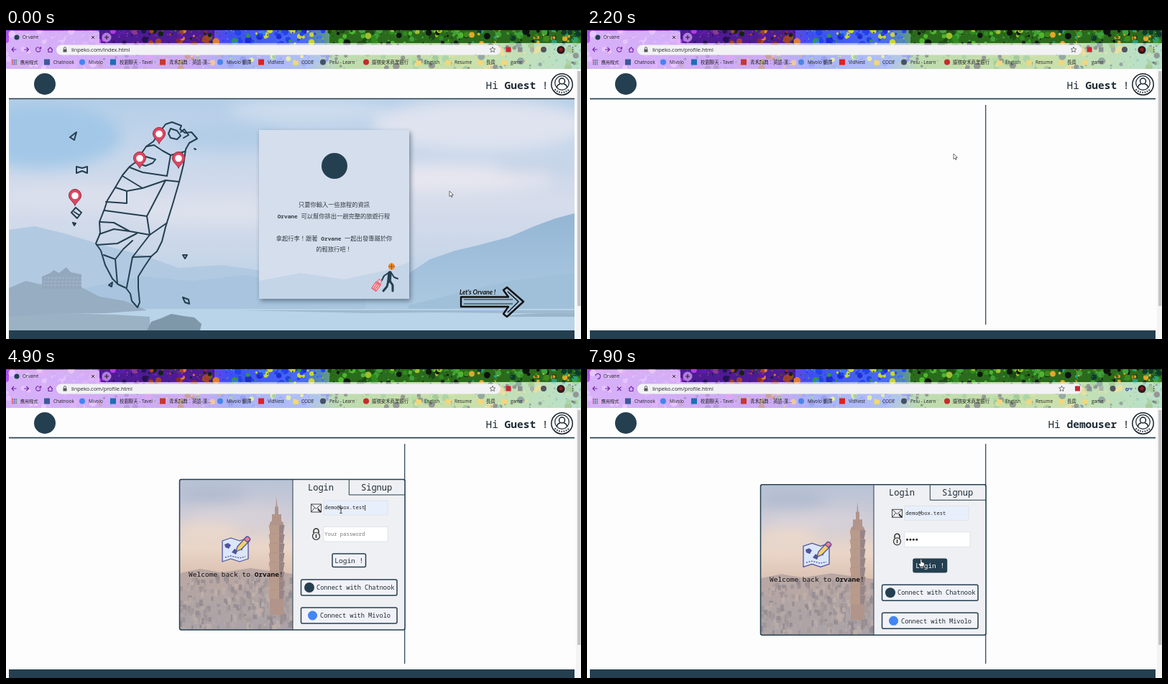
Write an HTML page that moves like this. It is 800x433 px and loops after 8 s.

```html
<!DOCTYPE html>
<html lang="zh-Hant">
<head>
<meta charset="utf-8">
<title>Orvane</title>
<style>
html, body { margin: 0; width: 100%; height: 100%; overflow: hidden; background: #fdfdfd; }
svg { display: block; width: 100vw; height: 100vh; }
text { font-family: "Open Sans", "Noto Sans CJK TC", "Noto Sans CJK JP", sans-serif; fill: #222; white-space: pre; }
.mono { font-family: "Noto Sans Mono", "DejaVu Sans Mono", monospace; fill: #1d2b35; }
.cjk { font-family: "Noto Sans CJK TC", "Noto Sans CJK JP", sans-serif; font-size: 8.27px; fill: #333c44; }
.cjk tspan { font: bold 7.8px "Noto Sans Mono", monospace; }
.bold { font-weight: bold; }
.ink { fill: none; stroke: #243f50; }
.map path { fill: none; stroke: #243f50; stroke-width: 2; stroke-linejoin: round; stroke-linecap: round; }
</style>
</head>
<body>
<svg id="stage" viewBox="0 0 800 433" preserveAspectRatio="none">
  <defs>
    <linearGradient id="paint">
      <stop offset="0" stop-color="#a44df0"/><stop offset=".33" stop-color="#8b3fe8"/>
      <stop offset=".39" stop-color="#3d50ee"/><stop offset=".52" stop-color="#4a6cf0"/>
      <stop offset=".58" stop-color="#6cb04a"/><stop offset=".8" stop-color="#86b83e"/>
      <stop offset="1" stop-color="#5cb888"/>
    </linearGradient>
    <linearGradient id="sky" x2="0" y2="1">
      <stop offset="0" stop-color="#b4cee8"/><stop offset=".25" stop-color="#c8d7eb"/>
      <stop offset=".45" stop-color="#d6dceb"/><stop offset=".65" stop-color="#cad7e9"/>
      <stop offset=".88" stop-color="#b6cfe6"/><stop offset="1" stop-color="#b8d2e8"/>
    </linearGradient>
    <linearGradient id="ridge" x2="0" y2="1">
      <stop offset="0" stop-color="#94b6d4"/><stop offset="1" stop-color="#aecae2"/>
    </linearGradient>
    <linearGradient id="dusk" x2="0" y2="1">
      <stop offset="0" stop-color="#b9c3d6"/><stop offset=".25" stop-color="#cfccd6"/>
      <stop offset=".45" stop-color="#ead6c8"/><stop offset=".62" stop-color="#dcc3b4"/>
      <stop offset=".7" stop-color="#b5a5a3"/><stop offset="1" stop-color="#a9a3a8"/>
    </linearGradient>
    <filter id="soft" x="-30%" y="-60%" width="160%" height="220%"><feGaussianBlur stdDeviation="10"/></filter>
    <filter id="shade" x="-10%" y="-10%" width="120%" height="120%"><feGaussianBlur stdDeviation="3"/></filter>
    <clipPath id="strip"><rect y="3" width="800" height="54"/></clipPath>
    <clipPath id="view"><rect x="4" y="100" width="787" height="321"/></clipPath>
    <clipPath id="pane"><rect x="242" y="157" width="157" height="209"/></clipPath>
  </defs>

  <rect width="800" height="433" fill="#fdfdfd"/>
  <g id="browser"></g>

  <g id="home">
    <g clip-path="url(#view)">
      <rect x="4" y="100" width="787" height="321" fill="url(#sky)"/>
      <g filter="url(#soft)">
        <ellipse cx="50" cy="150" rx="110" ry="45" fill="#a3c8e7"/>
        <ellipse cx="310" cy="150" rx="80" ry="20" fill="#b3cde7"/>
        <ellipse cx="420" cy="115" rx="110" ry="14" fill="#d0deee"/>
        <ellipse cx="660" cy="135" rx="150" ry="36" fill="#dfe3ef"/>
        <ellipse cx="610" cy="210" rx="150" ry="20" fill="#e6e6ef"/>
        <ellipse cx="100" cy="235" rx="110" ry="14" fill="#dbe0ec"/>
        <ellipse cx="300" cy="255" rx="130" ry="18" fill="#dde1ed"/>
        <ellipse cx="740" cy="195" rx="60" ry="7" fill="#c3d1e5"/>
      </g>
      <path d="M4 281L40 276 85 287 130 301 190 316 240 334 300 330 350 337 440 322 520 334 600 349V396H4Z" fill="#b1cae1"/>
      <path d="M110 362L190 346 260 352 330 344 420 356 520 366V396H110Z" fill="#a8c4de"/>
      <path d="M500 372L545 352 590 322 625 310 655 303 700 291 735 276 765 265 791 258V396H500Z" fill="url(#ridge)"/>
      <path d="M560 386L640 366 700 352 791 341V396H560Z" fill="#a0c0da"/>
      <rect x="4" y="391" width="787" height="30" fill="#b9d3e8"/>
      <path d="M330 393H791V398L600 396 500 397Z" fill="#9fbad0"/>
      <path d="M4 362L28 352 48 357 70 352 105 361 130 374 165 380 196 393 140 397 70 398 4 404Z" fill="#97adc2"/>
      <path d="M50 363V346L62 341 66 337 74 341 84 333 90 340 105 343V363Z" fill="#94a8bd"/>
      <path d="M53 348H104M52 353H105M52 358H105" stroke="#adbdcd" stroke-dasharray="3 2"/>
      <path d="M4 402L80 397 150 399 200 402V421H4Z" fill="#9bb2c5"/>
      <path d="M196 421L202 409 216 404 230 398 247 401 262 403 272 412 270 421Z" fill="#7f98a9"/>
      <path d="M700 400Q740 396 791 398V402H690Z" fill="#9ab5c9"/>
    </g>
    <g id="map" class="map"></g>
    <rect x="354" y="145" width="209" height="235" fill="#38495a" opacity=".6" filter="url(#shade)"/>
    <rect x="352" y="142" width="209" height="235" fill="#d5deec"/>
    <path d="M352 352L410 341 470 350 530 337 561 326V377H352Z" fill="#c4d5e8"/>
    <circle cx="457" cy="192" r="18" fill="#243f50"/>
    <g text-anchor="middle">
      <text class="cjk" x="456.500" y="249">只要你輸入一些旅程的資訊</text>
      <text class="cjk" x="456" y="265"><tspan>Orvane </tspan>可以幫你排出一趟完整的旅遊行程</text>
      <text class="cjk" x="456.500" y="295.500">拿起行李！跟著<tspan> Orvane </tspan>一起出發專屬於你</text>
      <text class="cjk" x="456" y="311">的輕旅行吧！</text>
    </g>
    <circle cx="536.500" cy="332" r="4.500" fill="#ee8a2c"/>
    <path d="M532 332h9M536.500 327.500v9" stroke="#7a4520" stroke-width=".7"/>
    <g fill="none" stroke="#243f50" stroke-linecap="round" stroke-linejoin="round">
      <path d="M534 341L533 352" stroke-width="5.500"/>
      <path d="M534 352L538 358 538 366M532 352L530 360 525 366" stroke-width="3"/>
      <path d="M536 341L540 347 545 349M532 341L526 345 523 351" stroke-width="2"/>
    </g>
    <g transform="rotate(35 515 359)">
      <rect x="511" y="353" width="9" height="13" rx="1.500" fill="#ee6a76"/>
      <path d="M513 356v8M515.500 356v8M518 356v8" stroke="#fff" stroke-width=".8"/>
      <path d="M513 353v-4h5v4" fill="none" stroke="#ee6a76"/>
    </g>
    <text x="631" y="371" font-size="8.800" style="font-family:Lato,sans-serif;font-style:italic;font-weight:bold;fill:#111">Let's Orvane !</text>
    <g fill="none" stroke="#111" stroke-width="2.400" stroke-linejoin="round">
      <path d="M633 374.500H699L692 365 697 361 720 381 697 402 692 398 699 388H633Z"/>
      <path d="M637 378H705M637 384H705" stroke-width=".9"/>
      <path d="M698 367L713 381 698 396" stroke-width="1.400"/>
    </g>
  </g>

  <path id="split" class="ink" d="M554.700 107V413" stroke-width="1.200"/>
  <g id="dialog"></g>

  <rect x="4" y="97.700" width="787" height="1.700" fill="#243f50"/>
  <rect x="4" y="421" width="787" height="12" fill="#243f50"/>
  <rect x="793" y="57" width="7" height="376" fill="#f4f4f4"/>
  <rect x="795" y="60" width="4.500" height="327" fill="#c5c5c7"/>
  <circle cx="54" cy="78" r="15" fill="#243f50"/>
  <text class="mono" x="754.500" y="85" font-size="14.500" text-anchor="end">Hi <tspan id="user" class="bold"></tspan> !</text>
  <g id="face" fill="none" stroke="#16222b" stroke-width="1.500">
    <circle cx="773.500" cy="78.500" r="14.700"/>
    <circle cx="773.500" cy="76.500" r="9.800" stroke-width="1.200"/>
    <circle cx="773.500" cy="74" r="4"/>
    <path d="M766.500 83Q767 78.500 771 78M780.500 83Q780 78.500 776 78"/>
    <path d="M763.500 85.500Q773.500 94 783.500 85.500" stroke-width="2" stroke-dasharray="1.500 1.800"/>
  </g>
  <g id="cursor">
    <path id="arrow" d="M0 0V7.500L1.800 6 2.900 8.500 4.100 8 3.100 5.500 5.300 5.300Z" fill="#fff" stroke="#333" stroke-width=".7"/>
    <path id="beam" d="M-1.700-3.500H-.3L0-3 .3-3.500H1.700M0-3V3M-1.700 3.500H-.3L0 3 .3 3.500H1.700" fill="none" stroke="#222" stroke-width=".9"/>
    <path id="hand" d="M-1.200-5Q0-6 .9-5V-1.500L4.300-.5V2.500L3.200 5H-1.500L-4 1Q-3.500-.5-1.200 1Z" fill="#fff" stroke="#222" stroke-width=".8"/>
  </g>
</svg>
<script>
const $ = id => document.getElementById(id);
const LOOP = 8000, INK = '#243f50';

const text = (x, y, size, str, attrs = '') =>
  `<text x="${x}" y="${y}" font-size="${size}" ${attrs}>${str}</text>`;
const mono = (x, y, size, str, attrs = '') => text(x, y, size, str, 'class="mono" ' + attrs);
const box = (x, y, w, h, attrs) => `<rect x="${x}" y="${y}" width="${w}" height="${h}" ${attrs}/>`;
const dot = (x, y, r, fill) => `<circle cx="${x}" cy="${y}" r="${r}" fill="${fill}"/>`;
const line = (d, color, width = 1.1, attrs = '') =>
  `<path d="${d}" fill="none" stroke="${color}" stroke-width="${width}" ${attrs}/>`;

function random(seed) {
  return () => (seed = (seed * 16807) % 2147483647) / 2147483647;
}

// Paint-splatter theme: each stretch has its own colours
function splatter() {
  const rnd = random(41);
  const zones = [
    [130, ['#a64cf2', '#c77bff', '#b452f0']],
    [200, ['#5a1aa8', '#b23ae0', '#261050', '#8a3a90']],
    [300, ['#10240c', '#5a1aa8', '#a04428', '#de7d35', '#8a2a20', '#2f7a2a']],
    [450, ['#2442e8', '#1e2bd0', '#3d78f5', '#2442e8', '#c8d630', '#2f9a3a']],
    [640, ['#0c160c', '#3fa03a', '#2f8a1e', '#4fb52e', '#9cc02e', '#1c4a14']],
    [800, ['#0c120e', '#3fa03a', '#28a078', '#c9b82a', '#0d3a2c', '#e0a82a', '#3c8a1c']]
  ];
  let out = box(0, 3, 800, 54, 'fill="url(#paint)"');
  out += box(130, 3, 160, 18, 'fill="#4d1b92"') + box(450, 3, 350, 18, 'fill="#2a6a1c"');
  for (let i = 0; i < 1100; i++) {
    const x = rnd() * 800;
    const y = 3 + rnd() ** 1.5 * 54;
    const [, colors] = zones.find(z => x < z[0]);
    out += dot(x.toFixed(1), y.toFixed(1), (.6 + rnd() ** 3 * 4.5).toFixed(1), colors[rnd() * colors.length | 0]);
  }
  return `<g clip-path="url(#strip)">${out}</g>`;
}

const folder = x => `<path d="M${x - 3.500} 44.500h3l1 1h3.500v6h-7.500z" fill="#f5d67a"/>`;

function browser() {
  const purple = '#7424a8';
  const marks = [
    [57, 66, 'Chatnook', '#3b5998', 1], [106, 115, 'Mivolo', '#4285f4'],
    [149, 158, '校園聊天 - Tavel', '#1b6fb5', 1], [218, 227, '青禾詞典：英語-漢...', '#c8372d', 1],
    [298, 307, 'Mivolo 翻譯', '#4a86e8'], [355, 364, 'VidNest', '#e02020', 1],
    [403, 411, 'CODE'], [441, 450, 'Pelu - Learn', '#46506a'],
    [501, 509, '遠嶺安禾商業銀行', '#c92a2a'], [574, 582, 'English'],
    [615, 624, 'Resume'], [660, 668, '長房'], [693, 702, 'game']
  ];
  let out = box(0, 0, 800, 3.5, 'fill="#000"') + splatter();
  out += '<path d="M0 21Q4 21 4 17V8Q4 4 8 4H126Q130 4 130 8V21H800V57H0Z" fill="#fff" opacity=".56"/>';
  out += `<g id="tabIcon">${dot(15, 13, 3.5, INK)}</g>`;
  out += `<g id="spinner">${line('M15 9.500A3.500 3.500 0 1 1 11.500 13', purple)}</g>`;
  out += text(23, 15.3, 6.5, 'Orvane') + line('M119 11l4 4M123 11l-4 4', '#333', 1);
  out += dot(140, 13, 6.5, '#b27be0') + line('M137 13h6M140 10v6', '#222');
  out += line('M735 13h5M760 11h5v5h-5zM785 11l5 5M790 11l-5 5', '#1c241e', 1);
  out += line('M14.500 30H8M11 27L8 30 11 33M25 30h6.500M28.500 27l3 3-3 3', purple);
  out += `<g id="reload">${line('M47.500 28A3.300 3.300 0 1 0 48 31M48.500 26v3h-3', purple)}</g>`;
  out += `<g id="stop">${line('M42 27.500l5.500 5.500M47.500 27.500l-5.500 5.500', purple)}</g>`;
  out += line('M58 30.500l3.500-3.500 3.500 3.500M59 30v3.500h5V30', purple);
  out += box(70, 23.5, 618, 14, 'rx="7" fill="#f2f2f5"');
  out += box(79.5, 29.5, 5, 4, 'fill="#555"') + line('M80.500 29.500V28a1.500 1.500 0 0 1 3 0v1.500', '#555', .9);
  out += text(91, 33, 7.4, '', 'id="url"');
  out += `<g id="star">${line('M677 26.300l1.100 2.500 2.700.3-2 1.800.6 2.700-2.400-1.400-2.400 1.400.6-2.700-2-1.800 2.700-.3z', '#555', .8)}</g>`;
  out += `<g id="ext">${box(695.5, 26.5, 7, 7, 'fill="#c92332"')}${box(712, 27, 6.5, 6.5, 'fill="#8b8f95"')}` +
    `${box(729, 27, 6, 6, 'fill="#a9b3a6"')}${dot(748, 30, 4, '#50545c')}</g>`;
  out += `<g id="key">${line('M752.500 30a1.700 1.700 0 1 0 .1 .1M753 30h6M757 30v2.200', '#3b4aa8', 1.2)}</g>`;
  out += dot(772, 30.500, 5.5, '#32151a') + dot(772, 30, 2.5, '#8c1c22');
  out += [27, 30, 33].map(y => dot(788.5, y, .8, '#333')).join('');
  for (let i = 0; i < 9; i++)
    out += box(8 + i % 3 * 2.7, 44 + (i / 3 | 0) * 2.7, 1.8, 1.8, `fill="${['#d94a3d', '#3f6fd0', '#4a9a4a'][i % 3]}"`);
  out += text(20, 50, 6.1, '應用程式');
  for (const [ix, x, label, color, square] of marks) {
    out += !color ? folder(ix) : square ? box(ix - 4, 43.5, 8, 8, `fill="${color}"`) : dot(ix, 47.5, 4, color);
    out += text(x, 50, 6.4, label);
  }
  return out + text(786, 50, 8, '»');
}

function map() {
  const lines = [
    'M231 131L244 136 242 141 249 146 258 145 266 154 255 160 250 169 247 190 241 214 232 245 222 277 217 297 210 311 202 318 192 333 184 346 184 362 186 382 183 389 175 380 173 370 167 362 156 357 148 349 138 330 132 310 125 300 131 286 130 270 137 252 141 240 152 222 162 205 172 193 180 187 195 165 205 158 213 146 222 134Z',
    'M229 140L238 143 243 150 238 155 229 153 226 147ZM243 145L248 141 254 149 247 153',
    'M195 165L206 163 218 171 229 177 249 172M180 187L194 192 204 188 208 183 194 179',
    'M172 194L190 201 224 206 229 177M162 206L190 223 222 212 241 214',
    'M152 222L168 227 190 223M139 242L168 244 168 227M137 254L166 258 196 262 222 212',
    'M131 270L150 271 172 283 200 288 196 262M130 287L150 280 172 283M126 302L155 300 182 286',
    'M136 316L152 322 163 308 176 296M152 322L155 356M168 361L176 319 200 288M176 319L202 318M200 288L223 272',
    'M89 152L98 145 95 156ZM98 193L106 195 113 193V202L106 199 98 202ZM91 257L97 250 105 257 99 265ZM95 256L101 260',
    'M93 271L97 272 95 275ZM246 316L252 316 249 321ZM143 358L148 354 147 360ZM246 375L254 378 255 384 249 382ZM262 168L264 169'
  ];
  const pin = ([x, y]) => `<g transform="translate(${x} ${y})">
    <path d="M0 0C-3-6-8.500-8-8.500-14A8.500 8.500 0 0 1 8.500-14C8.500-8 3-6 0 0Z" style="fill:#df4560;stroke:#8b3347;stroke-width:1"/>
    <circle cy="-13.500" r="4.800" fill="#fff"/></g>`;
  return lines.map(d => `<path d="${d}"/>`).join('') +
    [[213, 161], [186, 195], [240, 195], [96, 247]].map(pin).join('');
}

function city() {
  const rnd = random(7);
  const tones = ['#9d9296', '#b5a8a6', '#8e878e', '#c0b0aa', '#a59a9b'];
  let out = box(242, 157, 157, 209, 'fill="url(#dusk)"');
  out += '<g filter="url(#soft)"><ellipse cx="285" cy="178" rx="50" ry="9" fill="#abb7cd"/>' +
    '<ellipse cx="320" cy="205" rx="70" ry="8" fill="#dcd4da"/><ellipse cx="280" cy="228" rx="45" ry="8" fill="#f2dcc8"/></g>';
  out += '<path d="M242 287L270 281 300 286 340 280 399 288V310H242Z" fill="#b9a7a4"/>';
  for (let i = 0; i < 300; i++) {
    const y = 291 + i * .24;
    const w = 2 + rnd() * 4;
    out += box((240 + rnd() * 156).toFixed(1), (y - rnd() * 5).toFixed(1), w.toFixed(1), (4 + rnd() * 6).toFixed(1), `fill="${tones[rnd() * 5 | 0]}" opacity=".75"`);
  }
  out += '<path d="M376 180L377.500 194 379 195V205H383V214L386 217V345H367V217L370 214V205H374V195L375.500 194Z" fill="#b1958a"/>';
  for (let y = 220; y < 318; y += 13)
    out += `<path d="M365.500 ${y}H387.500L385.500 ${y + 12}H367.500Z" fill="#b99b8c"/><path d="M380 ${y}H387.500L385.500 ${y + 12}H380Z" fill="#988587"/>`;
  return `<g clip-path="url(#pane)">${out}</g>`;
}

function mapIcon() {
  const edge = '#51549a';
  return `<g stroke="${edge}" stroke-width="1.300" stroke-linejoin="round">
    <path d="M301 242L313 238 325 242 337 238V267L325 271 313 267 301 271Z" fill="#dbe6fb"/>
    <path d="M304 247l5-2 4 3-3 5-5-2zM314 258l4-5 4 3-2 5zM325 250l5 1-2 5z" fill="${edge}" stroke="none"/>
    <path d="M305 265l8-2 12 3 8-2" fill="none" stroke-dasharray="2 1.500"/>
    <path d="M320 257L322 250 334 237 339 242 327 254Z" fill="#f5cf6a"/>
    <path d="M331 240L335 236Q338 236 340 240L336 244Z" fill="#ef7a9a"/></g>`;
}

function dialog() {
  const frame = 'rx="2" fill="#f1f2f7" stroke="#243f50" stroke-width="1.500"';
  const field = 'fill="#fff" stroke="#dcdee3" stroke-width=".8"';
  let out = box(241.5, 156.5, 313.5, 209.5, 'rx="2.500" fill="#eff0f4"') + city() + mapIcon();
  out += mono(254, 292, 9.55, 'Welcome back to <tspan class="bold">Orvane</tspan>!', 'style="fill:#111"');
  out += line('M399 157V366M477.300 157V178H555', INK, 1);
  out += box(241.5, 156.5, 313.5, 209.5, 'rx="2.500" class="ink" stroke-width="1.500"');
  out += mono(420, 172, 12, 'Login') + mono(494, 172, 12, 'Signup');
  out += line('M424.500 191H438.500V202H424.500ZM424.500 191L431.500 197.500 438.500 191M424.500 202l5-6M438.500 202l-5-6', '#333', .9) + line('M434 198l4 4', '#333', 2);
  out += line('M428 231V228.500a3.500 3.500 0 0 1 7 0V231', '#333', 1.6) + '<circle cx="431.500" cy="235.500" r="5" fill="#eee" stroke="#333" stroke-width="1.200"/>' + line('M431.500 233v5', '#333', 1.5);
  out += box(442, 186, 89, 20, `id="mail" ${field}`) + box(442, 222.5, 89, 20.5, `id="pass" ${field}`);
  out += mono(443.3, 198.4, 7.2, '', 'id="mailText"') + mono(443.3, 235, 7.2, '', 'id="passText"');
  out += '<path id="caret" stroke="#111" stroke-width=".8"/><g id="dots"></g>';
  out += box(454, 260, 46.5, 18.5, `id="button" ${frame}`) + mono(457.3, 272.5, 9.5, 'Login !', 'id="buttonText"');
  out += box(410.5, 296, 133.5, 22, frame) + dot(422, 307, 7, INK) + mono(432, 310, 8.6, 'Connect with Chatnook');
  out += box(410.5, 335, 133.5, 22, frame) + dot(426.5, 346, 6.5, '#4285f4') + mono(437, 349.3, 8.6, 'Connect with Mivolo');
  return out;
}

$('browser').innerHTML = browser();
$('map').innerHTML = map();
$('dialog').innerHTML = dialog();

// time, x, y
const path = [
  [0, 617, 227], [200, 617, 227], [1200, 774, 96], [1850, 774, 96], [2200, 510, 175],
  [2700, 466, 200], [5400, 466, 200], [5900, 458, 245], [6150, 460, 236],
  [7000, 460, 236], [7400, 465, 273], [LOOP, 465, 273]
];
const mail = 'demo@box.test';
const ease = k => k * k * (3 - 2 * k);
const ramp = (t, a, b) => ease(Math.min(1, Math.max(0, (t - a) / (b - a))));
const show = (id, on) => { $(id).style.display = on ? '' : 'none'; };
const write = (id, str) => { if ($(id).textContent !== str) $(id).textContent = str; };

function pointer(t) {
  const i = path.findIndex(p => p[0] > t);
  const [t0, x0, y0] = path[i - 1], [t1, x1, y1] = path[i];
  const k = ramp(t, t0, t1);
  const kind = t < 1150 ? 'arrow' : t < 1900 ? 'hand' : t < 2600 ? 'arrow' : t < 7200 ? 'beam' : 'hand';
  $('cursor').setAttribute('transform', `translate(${x0 + (x1 - x0) * k} ${y0 + (y1 - y0) * k})`);
  for (const id of ['arrow', 'beam', 'hand']) show(id, id === kind);
}

function form(t) {
  const filled = t >= 4900;
  const typed = filled ? mail : mail.slice(0, t < 3900 ? 0 : t < 4300 ? 1 : 2);
  const count = Math.max(0, Math.min(4, Math.floor((t - 6500) / 110)));
  const inPass = t >= 6200;
  write('mailText', typed || 'Your Email');
  $('mailText').style.fill = typed ? '#222' : '#777';
  $('mail').setAttribute('fill', filled ? '#e8effc' : '#fff');
  write('passText', count ? '' : 'Your password');
  $('passText').style.fill = '#777';
  $('pass').setAttribute('width', count ? 91 : 89);
  $('dots').innerHTML = Array.from({ length: count }, (_, i) => dot(445.5 + i * 4.4, 233, 1.5, '#222')).join('');
  $('caret').setAttribute('d', inPass
    ? `M${443.5 + count * 4.4} 229v8` : `M${443.5 + typed.length * 4.32} 192v8`);
  show('caret', t >= 2950 && t < 7500 && (t < 3300 || t > 3700));
  const hover = t >= 7300;
  $('button').setAttribute('fill', hover ? INK : '#f1f2f7');
  $('buttonText').style.fill = hover ? '#fff' : '#1d2b35';
}

function draw(t) {
  const loading = (t >= 1500 && t < 2100) || t >= 7600;
  const hasKey = t >= 6600;
  const over = t >= 1100 && t < 1900;
  const shift = `translate(${hasKey ? -16.5 : 0})`;
  write('url', 'linpeko.com/' + (t < 1500 ? 'index' : 'profile') + '.html');
  write('user', t < 7700 ? 'Guest' : 'demouser');
  show('spinner', loading);
  show('tabIcon', !loading);
  show('stop', loading);
  show('reload', !loading);
  show('key', hasKey);
  $('star').setAttribute('transform', shift);
  $('ext').setAttribute('transform', shift);
  $('spinner').setAttribute('transform', `rotate(${t * .4 % 360} 15 13)`);
  $('face').setAttribute('transform', over ? 'translate(773.500 78.500) scale(1.100) translate(-773.500 -78.500)' : '');
  show('home', t < 1900);
  show('split', t >= 2000);
  show('dialog', t >= 2600);
  $('dialog').setAttribute('opacity', ramp(t, 2600, 2950));
  $('dialog').setAttribute('transform', `translate(0 ${10 * (1 - ramp(t, 2600, 2950)) + 7.3 * ramp(t, 7700, 7880)})`);
  form(t);
  pointer(t);
}

const start = performance.now();
function tick() {
  draw((performance.now() - start) % LOOP);
  requestAnimationFrame(tick);
}
tick();
</script>
</body>
</html>
```
